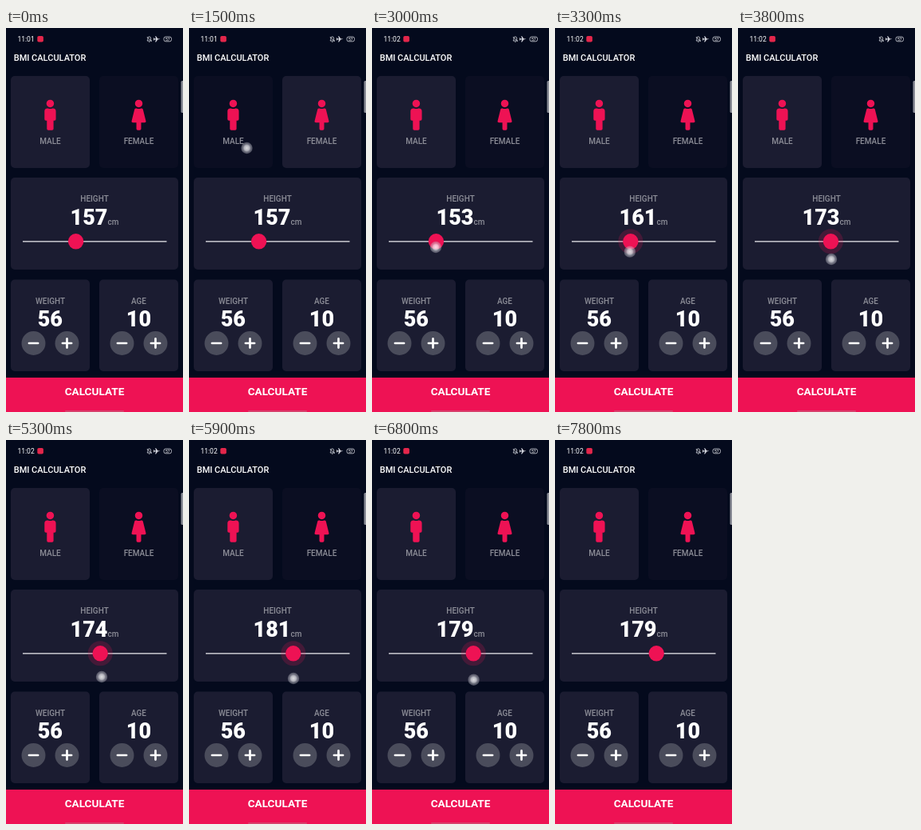
These frames come from a looping animation (222 px wide and 480 px high, 8 s). An HTML page:

```html
<!DOCTYPE html>
<html lang="en">
<head>
<meta charset="utf-8">
<title>BMI calculator</title>
<style>
  html, body { margin: 0; width: 100%; height: 100%; overflow: hidden; background: #040a1d; }
  svg { display: block; width: 100%; height: 100%; }
  text { font-family: Roboto, "Noto Sans", sans-serif; fill: #fff; }
  .mid { text-anchor: middle; }
  .label { font-size: 10px; font-weight: 500; fill: #8d8e98; }
  .num { font-size: 27px; font-weight: 900; }
  .card { fill: #1b1c31; }
  .pink { fill: #ee1254; }
  .dim { fill: #0b0e22; }
  .line { fill: none; stroke: #d4d6de; stroke-width: .8; }
</style>
</head>
<body>
<svg viewBox="0 0 222 480">
  <defs>
    <radialGradient id="glow">
      <stop offset="0" stop-color="#fff" stop-opacity=".85"/>
      <stop offset=".45" stop-color="#f4f4f8" stop-opacity=".72"/>
      <stop offset=".7" stop-color="#d0d0d8" stop-opacity=".5"/>
      <stop offset="1" stop-color="#b8b8c2" stop-opacity=".35"/>
    </radialGradient>
    <g id="round">
      <circle r="15" fill="#4a4c5b"/>
      <path d="M-5.6 0H5.6" stroke="#fff" stroke-width="2.7" stroke-linecap="round"/>
    </g>
  </defs>

  <!-- status bar -->
  <text id="clock" x="14.5" y="17" font-size="8.5">11:01</text>
  <rect x="39.3" y="10" width="7.6" height="7.6" rx="1.8" fill="#e3264b"/>
  <path class="line" d="M177 16h5.400l-.8-1.200v-2a1.900 1.900 0 0 0-3.800 0v2zM179 17.300h1.400M176.800 11l6 6"/>
  <path fill="#d4d6de" d="M193.500 13.800l-3.200-.6-2.200-3h-1l1 3h-1.800l-.9-1h-.7l.5 1.600-.5 1.600h.7l.9-1h1.800l-1 3h1l2.200-3z"/>
  <rect class="line" x="198" y="11" width="9.500" height="5.800" rx="2.200"/>
  <text class="mid" x="202.700" y="15.700" font-size="5">57</text>

  <text x="9.700" y="41" font-size="11" font-weight="500">BMI CALCULATOR</text>

  <!-- gender -->
  <rect id="male" class="card" x="6" y="60" width="99" height="115" rx="5"/>
  <rect id="female" class="card" x="117" y="60" width="99" height="115" rx="5"/>
  <path class="pink" transform="translate(48.300 89.700) scale(.0743)" d="M96 0a64 64 0 1 1 0 128a64 64 0 1 1 0-128m48 144h-11.400c-22.700 10.400-49.500 10.900-73.200 0H48a48 48 0 0 0-48 48v136a24 24 0 0 0 24 24h16v136a24 24 0 0 0 24 24h64a24 24 0 0 0 24-24V352h16a24 24 0 0 0 24-24V192a48 48 0 0 0-48-48z"/>
  <path class="pink" transform="translate(157 89.700) scale(.0743)" d="M128 0a64 64 0 1 1 0 128a64 64 0 1 1 0-128m119.300 354.200l-48-192A24 24 0 0 0 176 144h-11.400c-22.700 10.400-49.500 10.900-73.200 0H80a24 24 0 0 0-23.300 18.200l-48 192A24 24 0 0 0 32 384h56v104a24 24 0 0 0 24 24h32a24 24 0 0 0 24-24V384h56a24 24 0 0 0 23.300-29.800z"/>
  <text class="mid label" x="55.500" y="144.500">MALE</text>
  <text class="mid label" x="166.500" y="144.500">FEMALE</text>

  <!-- height -->
  <rect class="card" x="6" y="187" width="210" height="115" rx="5"/>
  <text class="mid label" x="111" y="217">HEIGHT</text>
  <text class="mid" x="111" y="245.500"><tspan id="height" class="num">157</tspan><tspan class="label">cm</tspan></text>
  <path d="M21 266.800H201.500" stroke="#eeeef2" stroke-width="1.300"/>
  <g id="knob">
    <circle id="halo" fill="#eb1555" fill-opacity=".2"/>
    <circle class="pink" r="9.700"/>
  </g>

  <!-- weight and age -->
  <rect class="card" x="6" y="314.500" width="99" height="114.500" rx="5"/>
  <rect class="card" x="117" y="314.500" width="99" height="114.500" rx="5"/>
  <text class="mid label" x="55.500" y="344.500">WEIGHT</text>
  <text class="mid label" x="166.500" y="344.500">AGE</text>
  <text class="mid num" x="55.300" y="372.500">56</text>
  <text class="mid num" x="166.500" y="372.500">10</text>
  <use href="#round" x="34.500" y="394"/>
  <use href="#round" x="76.500" y="394"/>
  <use href="#round" x="145.500" y="394"/>
  <use href="#round" x="187.500" y="394"/>
  <path d="M76.500 388.400v11.200M187.500 388.400v11.200" stroke="#fff" stroke-width="2.700" stroke-linecap="round"/>

  <!-- bottom button and screen edges -->
  <rect class="pink" y="437" width="222" height="43"/>
  <text class="mid" x="111" y="459" font-size="13.600" font-weight="700">CALCULATE</text>
  <rect x="74" y="478" width="74" height="2" rx="1" fill="#d8406c"/>
  <rect x="219.500" y="66" width="4" height="40" rx="1.500" fill="#8b8d97"/>

  <circle id="touch" r="7.200" fill="url(#glow)"/>
</svg>
<script>
const $ = id => document.getElementById(id);
const LOOP = 8000, STEP = 100;

// time, finger x, finger y, height in cm
const drag = [
  [3000, 80, 274, 153], [3800, 117, 289, 173], [4000, 119, 289, 174],
  [4300, 119, 289, 174], [4700, 116, 292, 172], [5100, 119, 295, 173.600],
  [5300, 120, 296, 174], [5900, 131, 298, 181], [6200, 131, 298, 181],
  [6900, 127, 300, 179], [7500, 127, 300, 179]
];
// start, end, x, y
const taps = [[800, 1100, 161, 142], [1500, 1800, 72.500, 150]];

const clamp = v => Math.max(0, Math.min(1, v));

function dragAt(t) {
  const i = drag.findIndex(k => k[0] > t);
  if (i < 0) return drag[drag.length - 1];
  if (i === 0) return [t, 0, 0, 157];
  const a = drag[i - 1], b = drag[i], p = (t - a[0]) / (b[0] - a[0]);
  return a.map((v, n) => v + (b[n] - v) * p);
}

function draw(t) {
  const [, dx, dy, cm] = dragAt(t);
  const value = Math.round(cm);
  const tap = taps.find(([from, to]) => t >= from && t < to);
  const dragging = t >= 3000 && t < 7600;
  const female = t >= 1000 && t < 1700;

  $('clock').textContent = t < 2300 ? '11:01' : '11:02';
  $('male').classList.toggle('dim', female);
  $('female').classList.toggle('dim', !female);
  $('height').textContent = value;
  $('knob').setAttribute('transform', `translate(${21 + (value - 120) * 1.8} 266.800)`);
  $('halo').setAttribute('r', 15.5 * clamp((t - 3000) / 200) * clamp((7800 - t) / 300));

  const [x, y] = tap ? tap.slice(2) : [dx, dy];
  $('touch').setAttribute('transform', `translate(${x} ${y})`);
  $('touch').style.display = tap || dragging ? '' : 'none';
}

const start = performance.now();
function tick() {
  const t = (performance.now() - start) % LOOP;
  draw(Math.floor(t / STEP) * STEP);
  requestAnimationFrame(tick);
}
tick();
</script>
</body>
</html>
```
